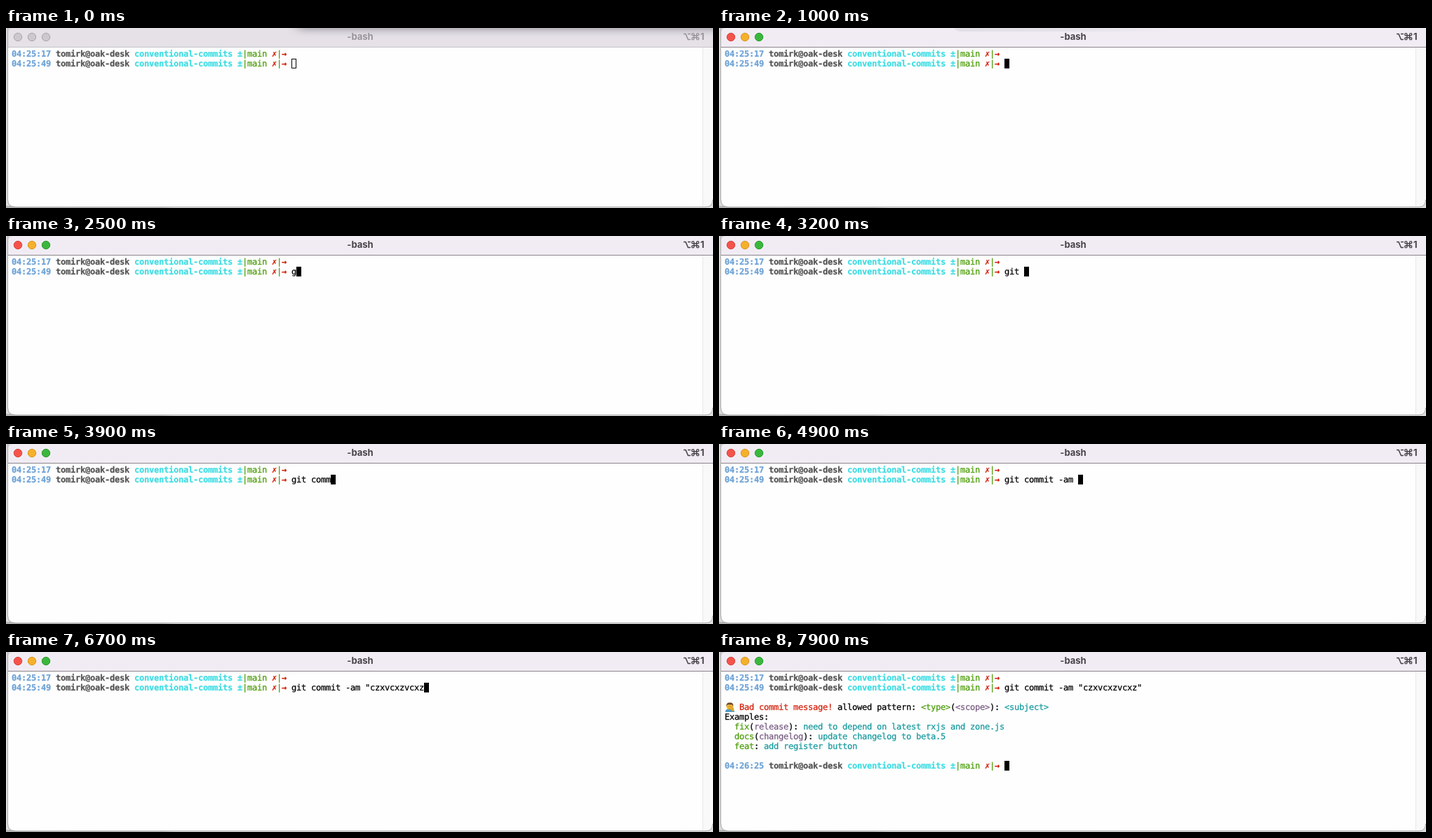
Write an HTML page that moves like this. It is 1008x258 px and loops after 8 s.

```html
<!DOCTYPE html>
<html lang="en">
<head>
<meta charset="utf-8">
<title>Terminal</title>
<style>
html, body { margin: 0; width: 100%; height: 100%; overflow: hidden; background: #dcdcdc; }
svg { display: block; }
.term text {
  font: 12px "DejaVu Sans Mono", monospace;
  letter-spacing: -.224px;
  white-space: pre;
  text-rendering: geometricPrecision;
}
.term .bold { font-weight: 700; }
.title { font: 700 13px Inter, sans-serif; text-anchor: middle; }
.key { font: 700 13px Inter, sans-serif; }
</style>
</head>
<body>
<svg id="stage" width="1008" height="258" viewBox="0 0 1008 258">
  <defs>
    <linearGradient id="edge">
      <stop offset="0" stop-color="#b4b4b4"/>
      <stop offset=".22" stop-color="#bcbcbc"/>
      <stop offset=".24" stop-color="#d8d8d8"/>
      <stop offset="1" stop-color="#dedede"/>
    </linearGradient>
    <linearGradient id="strip">
      <stop offset="0" stop-color="#e2dee5"/>
      <stop offset=".6" stop-color="#e6e2e9"/>
      <stop offset="1" stop-color="#f1ecf4"/>
    </linearGradient>
    <filter id="soft" filterUnits="userSpaceOnUse" x="360" y="-60" width="720" height="120">
      <feGaussianBlur stdDeviation="8 6"/>
    </filter>
    <clipPath id="frame"><path d="M3 0H1008V246Q1008 256 998 256H13Q3 256 3 246Z"/></clipPath>
  </defs>
  <rect width="1008" height="258" fill="#dedede"/>
  <rect y="255" width="1008" height="3" fill="url(#edge)"/>
  <g clip-path="url(#frame)">
    <rect width="1008" height="258" fill="#fefefe"/>
    <rect x="993" y="28" width="15" height="230" fill="#f9f9f9"/>
    <path d="M993.5 28V258" stroke="#e9e9e9"/>
    <rect id="bar" width="1008" height="27"/>
    <rect id="shadow" x="416" y="-40" width="640" height="42" fill="#66626b" opacity=".6" filter="url(#soft)"/>
    <path id="strip-shape" d="M335 0Q338 5 346 5H640V0Z" fill="url(#strip)"/>
    <path id="rule" d="M3 27.5H1008"/>
  </g>
  <path d="M2.5 0V246Q2.5 256.5 13 256.5H998Q1007.5 256.5 1007.5 246" fill="none" stroke="#a9a9a9"/>
  <path d="M3 0H9Q4 1 3 6Z" fill="#d5d2d7"/>
  <g id="lights"></g>
  <g id="labels">
    <text class="title" x="505" y="17">-bash</text>
    <path d="M966 8.5H969L972.5 16.5H976M972 8.5H976" fill="none" stroke-width="1.6"/>
    <path d="M981 10.6V9.2A1.6 1.6 0 1 0 979.4 10.8H986.2A1.6 1.6 0 1 0 984.6 9.2V15.3A1.6 1.6 0 1 0 986.2 13.7H979.4A1.6 1.6 0 1 0 981 15.3Z" fill="none" stroke-width="1.4"/>
    <text class="key" x="990" y="17">1</text>
  </g>
  <g class="term" id="term"></g>
</svg>
<script>
const NS = "http://www.w3.org/2000/svg";
const LOOP = 8000, FOCUS = 900, ENTER = 7800, RESULT = 7900;
const CELL = 7, LINE = 14, LEFT = 8, TOP = 30, INPUT = 57;
const C = {
  time: "#6da2d6", user: "#555555", dir: "#3fdde3", green: "#4b9d09",
  red: "#d3200c", black: "#000000", purple: "#785d82", teal: "#189a9f"
};
const $ = id => document.getElementById(id);

function set(el, attrs) {
  for (const k in attrs) el.setAttribute(k, attrs[k]);
}

function add(parent, tag, attrs, text) {
  const el = document.createElementNS(NS, tag);
  set(el, attrs);
  if (text !== undefined) el.textContent = text;
  return parent.appendChild(el);
}

// Runs are [text, colour, bold] and follow one another on the cell grid.
function line(parent, row, runs, col = 0) {
  for (const [text, fill, bold] of runs) {
    add(parent, "text", {
      x: LEFT + col * CELL, y: TOP + row * LINE + 11, fill,
      stroke: fill, "stroke-width": .25, class: bold ? "bold" : ""
    }, text);
    col += text.length;
  }
}

function prompt(parent, row, time) {
  line(parent, row, [
    [time + " ", C.time, true], ["tomirk@oak-desk ", C.user, true],
    ["conventional-commits ", C.dir, true], ["±", C.dir, true],
    ["|main ", C.green], ["✗", C.red, true], ["|", C.green], ["→", C.red, true]
  ]);
}

function example(parent, row, type, scope, subject) {
  const mid = scope ? [["(", C.black], [scope, C.purple], ["): ", C.black]] : [[": ", C.black]];
  line(parent, row, [[type, C.green], ...mid, [subject, C.teal]], 2);
}

function facepalm(parent) {
  const g = add(parent, "g", { transform: "translate(8 72)" });
  add(g, "path", { d: "M1 14Q1 9.5 6 9.5H9Q14 9.5 14 14Z", fill: "#4c9bc7" });
  add(g, "circle", { cx: 7.3, cy: 6, r: 4.8, fill: "#f6c13c" });
  add(g, "path", { d: "M2.4 6Q1.6 .4 7.5 .4T12.2 6L10.5 3.5H4Z", fill: "#6d4a2c" });
  add(g, "path", { d: "M4 5.2L10.2 4.8L12.8 8L13.4 12L10.6 13L9 8.2L4 7.4Z", fill: "#e5a52a" });
  add(g, "path", { d: "M5.6 10Q7 9 8.4 10", fill: "none", stroke: "#7b5521", "stroke-width": .8 });
}

const term = $("term");
prompt(term, 0, "04:25:17");
prompt(term, 1, "04:25:49");
line(term, 1, [["", C.black]], INPUT);
const typed = term.lastChild;
const cursor = add(term, "rect", { stroke: "#000" });
const result = add(term, "g", {});
facepalm(result);
line(result, 3, [
  ["Bad commit message! ", C.red], ["allowed pattern: ", C.black], ["<type>", C.green],
  ["(", C.black], ["<scope>", C.purple], ["): ", C.black], ["<subject>", C.teal]
], 3);
line(result, 4, [["Examples:", C.black]]);
example(result, 5, "fix", "release", "need to depend on latest rxjs and zone.js");
example(result, 6, "docs", "changelog", "update changelog to beta.5");
example(result, 7, "feat", "", "add register button");
prompt(result, 9, "04:26:25");

const lights = [["#f5534c", "#d6433d"], ["#f6b02c", "#d9951f"], ["#3bb73d", "#2b9a2f"]]
  .map(([fill, rim], i) => ({
    fill, rim, el: add($("lights"), "circle", { cx: 17 + 20 * i, cy: 13, r: 5.7 })
  }));

const command = 'git commit -am "czxvcxzvcxz"';
// Time of each key press, in tenths of a second.
const keys = [25, 26, 27, 28, 34, 36, 37, 39, 40, 41, 42, 44, 46, 47, 49, 52,
  58, 59, 60, 60, 61, 61, 62, 63, 65, 66, 67, 71];

function draw(t) {
  const active = t >= FOCUS;
  const ink = active ? "#484349" : "#98939a";
  set($("bar"), { fill: active ? "#f1ecf4" : "#e5e1e7" });
  set($("rule"), { stroke: active ? "#88848a" : "#c5c2c7" });
  set($("labels"), { fill: ink });
  for (const p of $("labels").querySelectorAll("path")) set(p, { stroke: ink });
  for (const { el, fill, rim } of lights) {
    set(el, { fill: active ? fill : "#cdc8ce", stroke: active ? rim : "#aaa5ab" });
  }
  set($("shadow"), { visibility: active ? "hidden" : "visible" });
  set($("strip-shape"), { visibility: active && t < 1700 ? "visible" : "hidden" });

  const count = keys.filter(k => k * 100 <= t).length;
  typed.textContent = command.slice(0, count);
  const done = t >= RESULT;
  set(result, { visibility: done ? "visible" : "hidden" });

  const row = done ? 9 : t >= ENTER ? 2 : 1;
  const col = done ? INPUT : t >= ENTER ? 0 : INPUT + count;
  const inset = active ? 0 : .5;
  set(cursor, {
    x: LEFT + col * CELL + inset, y: TOP + row * LINE + inset,
    width: CELL - 2 * inset, height: LINE - 2 * inset,
    fill: active ? "#000" : "none", "stroke-width": active ? 0 : 1
  });
}

const start = performance.now();
function tick() {
  draw(Math.floor(performance.now() - start) % LOOP);
  requestAnimationFrame(tick);
}
tick();
</script>
</body>
</html>
```
